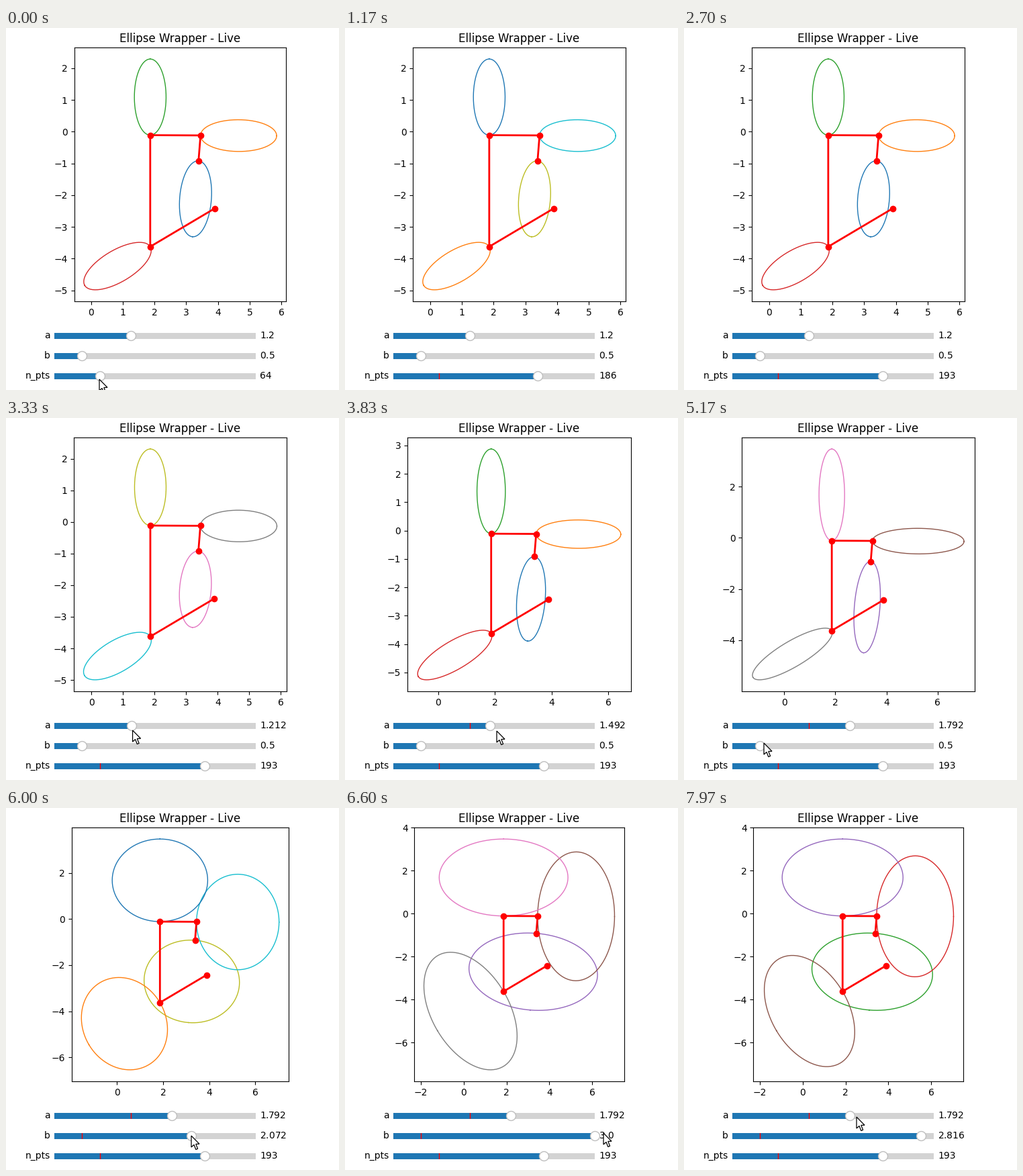
A matplotlib script that plays this animation: 496 px wide and 539 px high, repeating every 8 s.

```python
import numpy as np
import matplotlib.pyplot as plt
from matplotlib.animation import FuncAnimation
from matplotlib.patches import Polygon
from matplotlib.widgets import Slider

W, H, DPI = 496, 539, 100
LOOP, INTERVAL = 8000, 40
LOW, HIGH, TRACK = 0.1, 3.0, 300

# Joints of the open chain; every joint but the last carries an ellipse.
CHAIN = np.array([(3.387, -0.92), (3.4505, -0.118), (1.864, -0.11),
                  (1.864, -3.625), (3.892, -2.423)])

# Bursts of redraws at a steady rate: start ms, number of redraws.
REDRAW_GAP = 45
BURSTS = [(430, 20), (2830, 3), (3300, 17), (4170, 11), (5300, 12),
          (5830, 18), (7070, 2)]
GRAB_N, GRAB_A, GRAB_B = 430, 2830, 5300

# Stops of the mouse pointer (ms, x, y), and when it is out of sight.
STOPS = np.array([(430, 139, 523), (1470, 253, 534), (2230, 116, 447),
                  (3300, 187, 465), (3800, 226, 466), (4830, 247, 466),
                  (5160, 119, 484), (5300, 113, 488), (6000, 276, 488),
                  (6600, 385, 484), (7070, 385, 484), (7170, 353, 486),
                  (7370, 353, 486), (7960, 257, 460)])
HIDDEN = [(430, 1470), (2430, 2800)]
ARROW = np.array([(0, 0), (0, 17), (4, 13.4), (6.8, 20.5), (9.6, 19.3),
                  (6.8, 12.4), (12, 12.2)])


def drag(t, start, end, first, last):
    """A hand movement that slows down towards its end."""
    u = np.clip((t - start) / (end - start), 0, 1)
    return first + (last - first) * (1 - (1 - u) ** (4 / 3))


def last_redraw(t):
    """Number of redraws so far and the time of the latest one."""
    count, held = 0, 0
    for start, total in BURSTS:
        if t >= start:
            done = min(total, 1 + (t - start) // REDRAW_GAP)
            count += done
            held = start + (done - 1) * REDRAW_GAP
    return count, held


def from_pixels(x):
    return LOW + round(x) * (HIGH - LOW) / TRACK


def slider_values(held):
    """Values of a, b and n, and the largest b reached so far."""
    a, b, n, widest = 1.2, 0.5, 64, 0.5
    if held >= GRAB_N:
        n = round(drag(held, GRAB_N, 1240, 64, 193))
    if held >= GRAB_A:
        a = from_pixels(drag(held, 3280, 4570, 114, 175))
    if held >= GRAB_B:
        reach = min(TRACK, drag(held, GRAB_B, 6600, 41.4, 306))
        widest = from_pixels(reach)
        b = from_pixels(reach - drag(held, 7050, 7115, 0, 19))
    return a, b, n, widest


def ellipse(start, tip, a, b, n):
    """Ellipse that touches the tip and continues the segment's direction."""
    u = (tip - start) / np.hypot(*(tip - start))
    v = np.array([-u[1], u[0]])
    theta = np.linspace(0, 2 * np.pi, n)[:, None]
    return tip + a * u + a * np.cos(theta) * u + b * np.sin(theta) * v


def pixel_axes(left, top, width, height):
    return fig.add_axes([left / W, 1 - (top + height) / H, width / W, height / H])


def add_slider(top, label, low, high, initial, **options):
    slider = Slider(pixel_axes(72, top, TRACK, 18), label, low, high,
                    valinit=initial, **options)
    slider.drawon = False
    return slider


fig = plt.figure(figsize=(W / DPI, H / DPI), dpi=DPI)
ax = pixel_axes(69.5, 29, 380, 378)
ax.set_aspect("equal", adjustable="box")
ax.set_title("Ellipse Wrapper - Live")
curves = [ax.plot([], [], lw=1)[0] for _ in CHAIN[1:]]
ax.plot(*CHAIN.T, "ro-", lw=2)

sliders = [add_slider(449, "a", LOW, HIGH, 1.2),
           add_slider(479, "b", LOW, HIGH, 0.5),
           add_slider(509, "n_pts", 8, 256, 64, valstep=1, valfmt="%d")]

pointer = Polygon(ARROW, closed=True, fc="white", ec="black", lw=0.9,
                  transform=fig.transFigure, zorder=10)
fig.add_artist(pointer)


def update(frame):
    t = frame * INTERVAL
    count, held = last_redraw(t)
    a, b, n, widest = slider_values(held)
    for slider, value in zip(sliders, (a, b, n)):
        slider.set_val(value)

    # Every redraw takes the next four colours of the cycle.
    for i, (curve, tip, start) in enumerate(zip(curves, CHAIN, CHAIN[1:])):
        curve.set_data(*ellipse(start, tip, a, b, n).T)
        curve.set_color(f"C{(4 * count + i) % 10}")

    # The view grows with the ellipses but never shrinks.
    ax.relim()
    for tip, start in zip(CHAIN, CHAIN[1:]):
        ax.update_datalim(ellipse(start, tip, a, widest, n))
    ax.autoscale_view()

    pointer.set_visible(not any(s <= t < e for s, e in HIDDEN))
    x, y = (np.interp(t, STOPS[:, 0], STOPS[:, k]) for k in (1, 2))
    pointer.set_xy((0, 1) + (ARROW + (x, y)) * (1 / W, -1 / H))
    return curves


anim = FuncAnimation(fig, update, frames=LOOP // INTERVAL, interval=INTERVAL,
                     init_func=lambda: update(0), repeat=True, repeat_delay=0)
plt.show()
```
